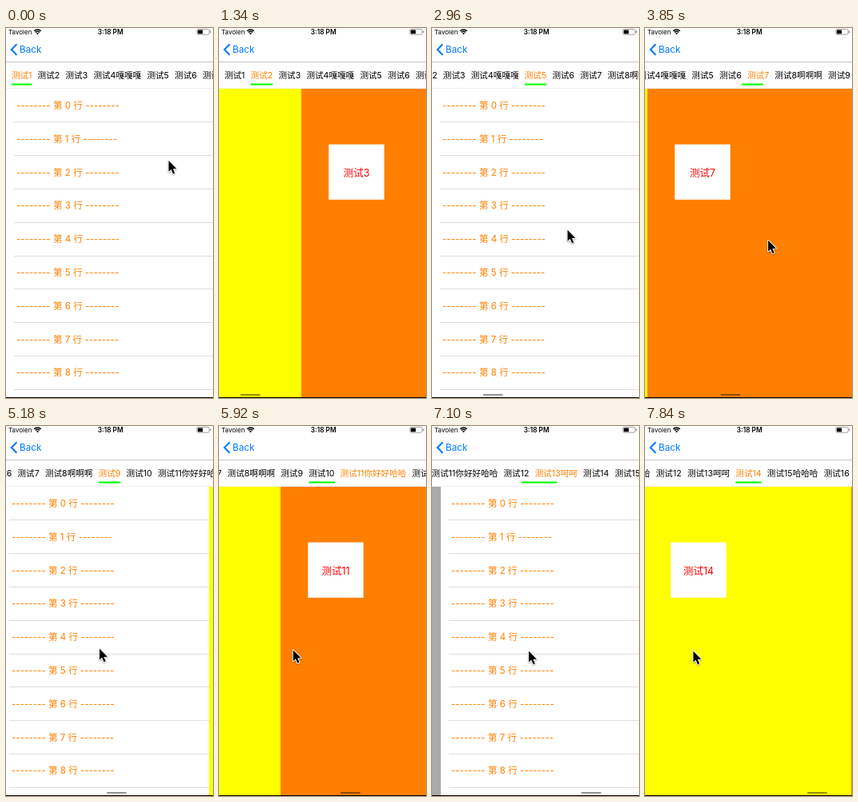
These frames come from a looping animation (259x463 px, 7.99 s). An HTML page with a canvas:

```html
<!DOCTYPE html>
<html lang="zh">
<head>
<meta charset="utf-8">
<style>
  html, body { margin: 0; width: 100%; height: 100%; overflow: hidden; background: #fff; }
  canvas { display: block; width: 259px; height: 463px; }
</style>
</head>
<body>
<canvas id="stage"></canvas>
<script>
const W = 259, H = 463, TOP = 76, BOTTOM = 462, PITCH = 260;
const LOOP = 7990, STEP = 147.8, LAST_STEP = 53;
const ORANGE = '#ff8000', BLUE = '#007aff';
const PAGE_COLORS = ['#fff', '#ffff00', ORANGE, '#aaa'];
const FAMILY = 'Inter, "Noto Sans CJK SC", "Noto Sans CJK", "Noto Sans CJK JP", sans-serif';
const TAB_FONT = `10.6px ${FAMILY}`, TAB_GAP = 7.2;
const SUFFIX = { 4: '嘎嘎嘎', 8: '啊啊啊', 11: '你好好哈哈', 13: '呵呵', 15: '哈哈哈' };

// Each swipe: start, duration, cursor x at press, cursor x at release
const SWIPES = [
  [500, 435, 205, 100], [1135, 435, 195, 95], [1770, 435, 190, 95],
  [2375, 435, 185, 100], [2980, 420, 172, 90], [3464, 420, 185, 112],
  [4035, 420, 196, 100], [4600, 420, 180, 75], [5168, 420, 121, 50],
  [5690, 420, 170, 85], [6209, 452, 180, 95], [6750, 420, 186, 90],
  [7290, 420, 160, 50], [7834.5, 420, 61, 30]
];
const RELEASE = 206;
const CURSOR_Y = [[0, 165], [2960, 252], [3850, 265], [5180, 278], [6510, 281], [LOOP, 281]];
const CURSOR_X = [[0, 203], ...SWIPES.flatMap(([s, , a, b]) => [[s, a], [s + RELEASE, b]])];

const canvas = document.getElementById('stage');
const ctx = canvas.getContext('2d');
const dpr = window.devicePixelRatio || 1;
canvas.width = Math.round(W * dpr);
canvas.height = Math.round(H * dpr);

const clamp = (v, lo, hi) => Math.max(lo, Math.min(hi, v));
const mix = (a, b, k) => a + (b - a) * k;
const smooth = u => u * u * (3 - 2 * u);
const smoother = u => u * u * u * (10 + u * (6 * u - 15));

function track(points, t) {
  for (let i = 1; i < points.length; i++) {
    const [t0, a] = points[i - 1], [t1, b] = points[i];
    if (t <= t1) return mix(a, b, (t - t0) / (t1 - t0));
  }
  return points[points.length - 1][1];
}

function rect(x, y, w, h, color) {
  ctx.fillStyle = color;
  ctx.fillRect(x, y, w, h);
}

function text(str, x, y, font, color, align = 'left') {
  ctx.font = font;
  ctx.fillStyle = color;
  ctx.textAlign = align;
  ctx.fillText(str, x, y);
}

function line(points, width, color) {
  ctx.beginPath();
  points.forEach(([x, y]) => ctx.lineTo(x, y));
  ctx.lineWidth = width;
  ctx.strokeStyle = color;
  ctx.stroke();
}

function pill(x, y, w, h, r, color) {
  ctx.beginPath();
  ctx.roundRect(x, y, w, h, r);
  ctx.fillStyle = color;
  ctx.fill();
}

function layoutTabs() {
  ctx.font = TAB_FONT;
  let x = 6.9;
  const list = [];
  for (let n = 1; n <= 16; n++) {
    const label = '测试' + n + (SUFFIX[n] || '');
    const w = ctx.measureText(label).width;
    list.push({ label, x, w });
    x += w + TAB_GAP;
  }
  list.forEach(tab => tab.offset = clamp(tab.x + tab.w / 2 - W / 2, 0, x - W));
  return list;
}
const tabs = layoutTabs();

// Scroll position in pages
function pageAt(t) {
  return SWIPES.reduce((sum, [start, dur]) => {
    const u = clamp((t - start) / dur, 0, 1);
    return sum + 1 - (1 - u ** 1.3) ** 2;
  }, 0);
}

function drawStatus() {
  text('Tavolen', 3, 8, `8px ${FAMILY}`, '#000');
  text('3:18 PM', 130.7, 8, `600 8.3px ${FAMILY}`, '#000', 'center');
  ctx.strokeStyle = '#000';
  ctx.lineWidth = 1.5;
  for (const r of [3.7, 6.1]) {
    ctx.beginPath();
    ctx.arc(39.5, 8, r, -Math.PI * 0.75, -Math.PI * 0.25);
    ctx.stroke();
  }
  ctx.beginPath();
  ctx.moveTo(39.5, 8.3);
  ctx.arc(39.5, 8.3, 2.2, -Math.PI * 0.75, -Math.PI * 0.25);
  ctx.fillStyle = '#000';
  ctx.fill();

  ctx.beginPath();
  ctx.roundRect(238.9, 1.4, 15.2, 6.8, 1.6);
  ctx.lineWidth = 0.7;
  ctx.strokeStyle = '#777';
  ctx.stroke();
  pill(239.9, 2.4, 6.3, 4.8, 0.7, '#000');
  pill(255, 3.6, 1, 2.4, 0.5, '#777');
}

function drawNav() {
  line([[13.4, 20.2], [6.8, 27], [13.4, 33.8]], 2.1, BLUE);
  text('Back', 17, 31.2, `11.7px ${FAMILY}`, BLUE);
  rect(0, 42, W, 1, '#c4c4c4');
}

function drawTabs(t) {
  const sel = SWIPES.filter(([s]) => t >= s + RELEASE).length;
  const prev = Math.max(0, sel - 1);
  const age = sel ? t - SWIPES[prev][0] - RELEASE : LOOP;
  const a = tabs[prev], b = tabs[sel];
  const offset = mix(a.offset, b.offset, smooth(clamp(age / 300, 0, 1)));
  const k = smoother(clamp(age / 270, 0, 1));

  tabs.forEach((tab, i) =>
    text(tab.label, tab.x - offset, 63, TAB_FONT, i === sel ? ORANGE : '#000'));
  rect(mix(a.x, b.x, k) - offset, 69.5, mix(a.w, b.w, k), 2.1, '#00ff00');
  rect(0, 75, W, 1, '#f0f0f0');
}

function drawList(x) {
  const rowH = 41.8;
  for (let i = 0; i < 9; i++) {
    const y = i * rowH;
    text(`-------- 第 ${i} 行 --------`, x + 13, y + 100.9, `11.6px ${FAMILY}`, ORANGE);
    rect(x + 10, Math.round(y + 117.35), PITCH - 10, 1, '#dedee0');
  }
}

function drawPage(i, x) {
  rect(x, TOP, PITCH, BOTTOM - TOP, PAGE_COLORS[i % 4]);
  if (i % 4 === 0) return drawList(x);
  rect(x + 34.3, 145.6, 69.4, 69.2, '#fff');
  text('测试' + (i + 1), x + 69, 185.6, `12.5px ${FAMILY}`, '#ff0000', 'center');
}

function drawPages(t) {
  const pos = pageAt(t), first = Math.floor(pos);
  ctx.save();
  ctx.beginPath();
  ctx.rect(0, TOP, W, BOTTOM - TOP);
  ctx.clip();
  for (let i = first; i <= first + 1; i++) drawPage(i, Math.round((i - pos) * PITCH));
  if (pos > 0) pill(2 + pos * 15.45, 458, 25, 2, 1, 'rgba(0,0,0,.42)');
  ctx.restore();
}

function drawCursor(t) {
  if (t > 1270 && t < 1410) return;
  ctx.save();
  ctx.translate(track(CURSOR_X, t), track(CURSOR_Y, t));
  ctx.beginPath();
  [[0.5, 0.8], [0.5, 14.6], [3.6, 11.7], [6, 17.2], [8.2, 16.2], [5.9, 10.9], [10.3, 10.7]]
    .forEach(([x, y]) => ctx.lineTo(x, y));
  ctx.closePath();
  ctx.lineJoin = 'round';
  ctx.lineWidth = 1.8;
  ctx.strokeStyle = '#fff';
  ctx.shadowColor = 'rgba(0,0,0,.35)';
  ctx.shadowBlur = 2 * dpr;
  ctx.shadowOffsetY = dpr;
  ctx.stroke();
  ctx.shadowColor = 'transparent';
  ctx.fillStyle = '#000';
  ctx.fill();
  ctx.restore();
}

function draw(t) {
  ctx.setTransform(dpr, 0, 0, dpr, 0, 0);
  rect(0, 0, W, H, '#fff');
  drawStatus();
  drawNav();
  drawTabs(t);
  drawPages(t);
  rect(0, BOTTOM, W, 1, '#000');
  drawCursor(t);
}

// The screen updates in even steps, like a low-rate recording
const origin = performance.now();
function tick() {
  const t = (performance.now() - origin) % LOOP;
  draw(Math.min(LAST_STEP, Math.floor(t / STEP)) * STEP + 8);
  requestAnimationFrame(tick);
}
tick();
</script>
</body>
</html>
```
